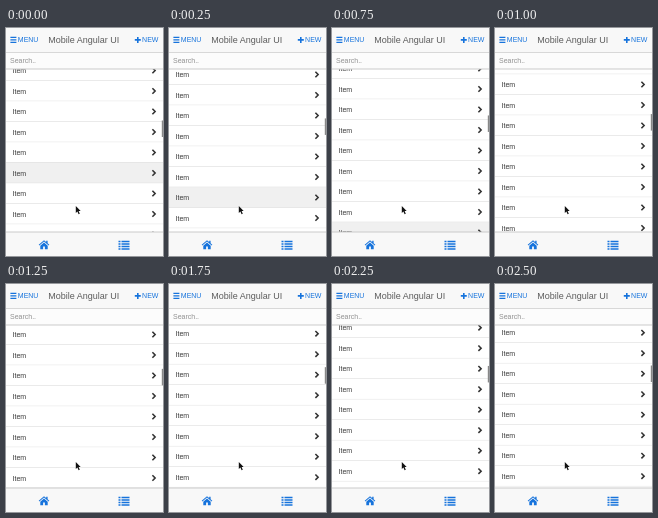
An HTML page that plays this animation: 157 by 228 pixels, repeating every 2750 ms.

```html
<!DOCTYPE html>
<html lang="en">
<head>
<meta charset="utf-8">
<title>Scrolling list</title>
<style>
html, body { margin: 0; width: 100%; height: 100%; overflow: hidden; background: #fff; }
svg { display: block; width: 100vw; height: 100vh; }
text { font: 7px "Liberation Sans", Arial, sans-serif; fill: #3a3a3a; }
.title { font-size: 9px; fill: #5c5c5c; }
.link { fill: #1673dc; }
.hint { fill: #909090; }
</style>
</head>
<body>
<svg viewBox="0 0 157 228">
  <defs>
    <clipPath id="view"><rect y="41" width="157" height="163"/></clipPath>
  </defs>
  <rect width="157" height="228" fill="#fff"/>
  <g id="list" clip-path="url(#view)"></g>
  <rect id="thumb" x="155.8" width="1.2" height="16.5" fill="#888"/>

  <rect width="157" height="25" fill="#f8f8f8"/>
  <rect y="24" width="157" height="1" fill="#d8d8d8"/>
  <rect y="25" width="157" height="16" fill="#fcfcfc"/>
  <rect y="40.5" width="157" height="1" fill="#ccc"/>
  <path class="link" d="M4.4 8.7h6v1.2h-6zm0 2.5h6v1.2h-6zm0 2.5h6v1.2h-6z"/>
  <text class="link" x="11.8" y="14.3">MENU</text>
  <text class="title" x="42.3" y="15.2">Mobile Angular UI</text>
  <path class="link" d="M131 8.9h1.6v2.2h2.2v1.6h-2.2v2.2H131v-2.2h-2.2v-1.6h2.2z"/>
  <text class="link" x="136.1" y="14.3">NEW</text>
  <text class="hint" x="4" y="35.3">Search..</text>

  <rect y="204" width="157" height="24" fill="#f8f8f8"/>
  <rect y="203.5" width="157" height="1" fill="#ccc"/>
  <path class="link" d="M38 212.3l2.2 1.8v-1.3h1.4v2.5l1.7 1.5-.6.7-4.7-4-4.7 4-.6-.7z"/>
  <path class="link" d="M38 214.5l3.7 3.2v3.6h-2.8v-2.8h-1.8v2.8h-2.8v-3.6z"/>
  <path class="link" d="M112.5 212.7h2v1.5h-2zm3 0h8v1.5h-8zm-3 2.5h2v1.5h-2zm3 0h8v1.5h-8zm-3 2.5h2v1.5h-2zm3 0h8v1.5h-8zm-3 2.5h2v1.5h-2zm3 0h8v1.5h-8z"/>

  <path d="M69.8 178v7l1.6-1.4 1.2 2.6 1.2-.5-1.2-2.6h2.1z" fill="#111" stroke="#fff" stroke-width=".6" paint-order="stroke"/>
</svg>
<script>
const LOOP = 2750, STEP = 250, ROW = 20.5, HOVERED = 145;
// Distance scrolled at each step of the slowing flick
const travel = [0, 24.5, 43, 59.5, 75.5, 90, 100.5, 109.7, 117.5, 124.2, 129.2];
const list = document.getElementById("list");
const thumb = document.getElementById("thumb");

function add(parent, tag, attrs, label) {
  const node = document.createElementNS("http://www.w3.org/2000/svg", tag);
  for (const key in attrs) node.setAttribute(key, attrs[key]);
  if (label) node.textContent = label;
  parent.appendChild(node);
  return node;
}

const rows = Array.from({ length: 10 }, () => {
  const g = add(list, "g", {});
  const back = add(g, "rect", { y: -ROW / 2, width: 157, height: ROW });
  add(g, "rect", { y: ROW / 2 - 0.5, width: 157, height: 0.8, fill: "#d9d9d9" });
  add(g, "text", { x: 6.5, y: 2.5 }, "Item");
  add(g, "path", { d: "M146.4 -2.7L149.1 0L146.4 2.7", fill: "none", stroke: "#333", "stroke-width": 1.6 });
  return { g, back };
});

function draw(time) {
  const shift = travel[Math.floor((time % LOOP) / STEP)];
  const hover = HOVERED + shift;
  const top = 22 + ((hover - 22) % ROW);
  rows.forEach(({ g, back }, i) => {
    const y = top + i * ROW;
    g.setAttribute("transform", `translate(0 ${y})`);
    back.setAttribute("fill", Math.abs(y - hover) < 1 ? "#f0f0f0" : "#fff");
  });
  thumb.setAttribute("y", 92.5 - shift * 0.085);
}

const start = performance.now();
function tick() {
  draw(performance.now() - start);
  requestAnimationFrame(tick);
}
tick();
</script>
</body>
</html>
```
